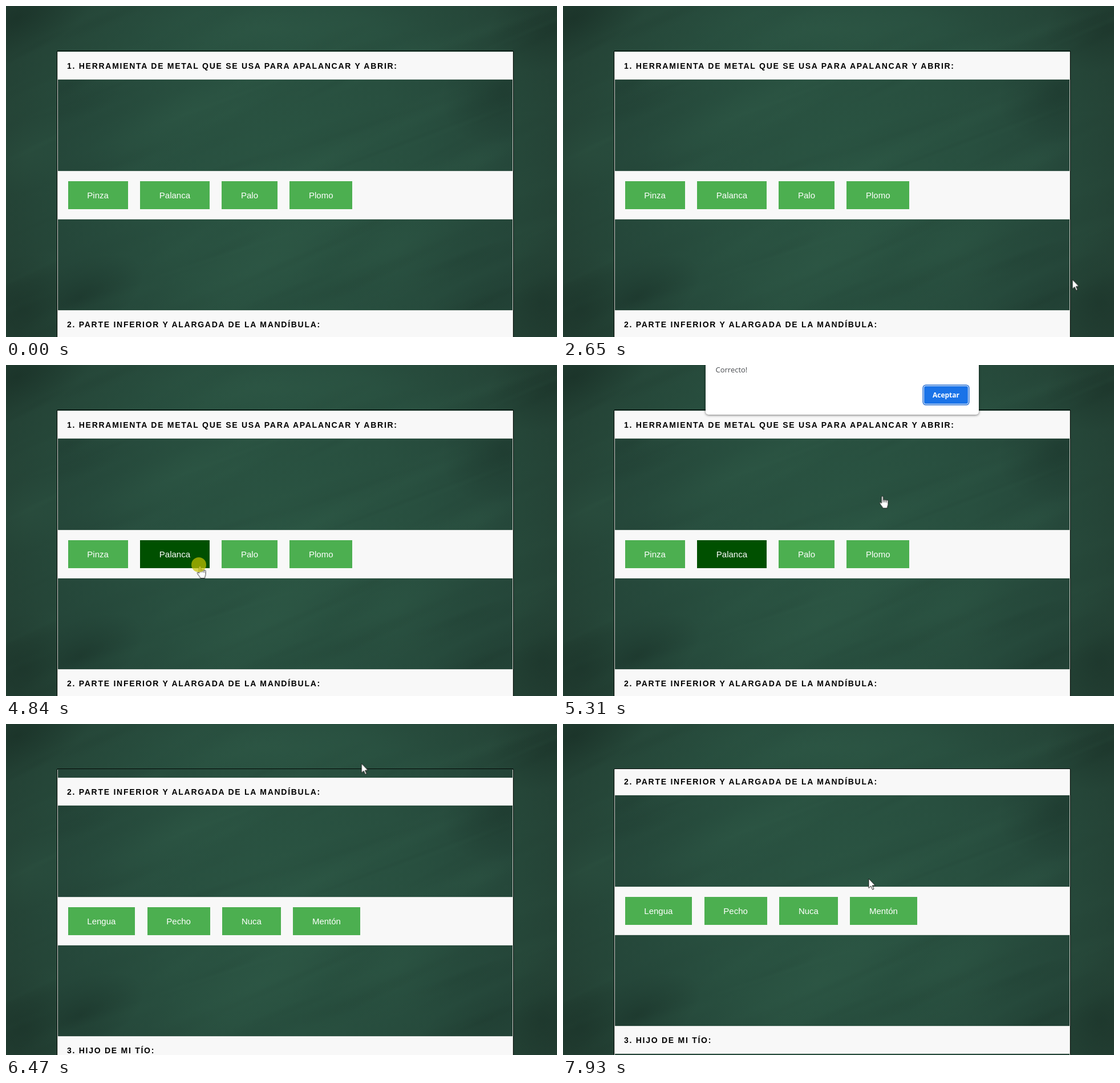
An HTML page with a canvas that plays this animation: 966 by 580 pixels, repeating every 8 s.

```html
<!DOCTYPE html>
<html lang="es">
<head>
<meta charset="utf-8">
<title>Quiz</title>
<style>
html, body { margin: 0; width: 966px; height: 580px; overflow: hidden; background: #264a3c; }
body { position: relative; font-family: "Liberation Sans", Arial, sans-serif; }
canvas { position: absolute; left: 0; top: 0; }

#panel {
  position: absolute; left: 89px; top: 78px; width: 799px; height: 520px;
  border: 1px solid #050a08; border-radius: 2px; overflow: hidden;
}
#panel::after {
  content: ""; position: absolute; inset: 1px 0 0;
  border: solid #d3dad2; border-width: 0 1px;
}
#list { position: absolute; inset: 0; animation: scroll 8s linear infinite; }
.title, .options {
  position: absolute; left: 0; width: 799px; box-sizing: border-box;
  display: flex; align-items: center; background: #f8f8f8; border: 1px solid #dcdfdc;
}
.title {
  height: 49px; padding-left: 16px; white-space: pre;
  font-weight: bold; font-size: 14px; letter-spacing: 1.73px; color: #000;
}
.options { height: 85px; padding-left: 17.5px; gap: 21.4px; }
.options span {
  height: 49px; line-height: 49px; padding: 0 33.8px;
  background: #4caf50; color: #fff; font-size: 15px;
}
.options .pick { animation: pick 8s step-end infinite; }

#dialog {
  position: absolute; left: 250px; top: -60px; width: 479px; height: 147px;
  background: #fff; border-radius: 5px; box-shadow: 0 1px 4px rgba(0,0,0,.55);
  font-family: "Open Sans", "Noto Sans", sans-serif;
  animation: dialog 8s linear infinite;
}
#dialog p {
  position: absolute; left: 17.5px; top: 58px; margin: 0;
  font-size: 13px; line-height: 20px; color: #4a4d51;
}
#dialog b {
  position: absolute; left: 383px; top: 97px; width: 77px; height: 31px;
  line-height: 31px; text-align: center; font-size: 12px; font-weight: 700;
  color: #fff; background: #1a73e8; border-radius: 3px;
  box-shadow: 0 0 0 1px #fff, 0 0 0 2.5px #1a66d0;
  animation: press 8s step-end infinite;
}

#cursor { position: absolute; left: 0; top: 0; width: 1px; height: 1px; overflow: visible; animation: move 8s linear infinite; }
#cursor path { stroke-linejoin: round; }
#arrow { animation: arrow 8s step-end infinite; }
#hand { animation: hand 8s step-end infinite; }
#ring { animation: ring 8s step-end infinite; }

@keyframes scroll {
  0% { transform: translateY(0); }
  77.44% { transform: translateY(0); animation-timing-function: ease-in-out; }
  81.45%, 100% { transform: translateY(-457px); }
}
@keyframes pick {
  0% { background: #4caf50; }
  54.875%, 100% { background: #005000; }
}
@keyframes dialog {
  0%, 62.5% { transform: translateY(-24px); opacity: 0; }
  63.75%, 77.375% { transform: none; opacity: 1; }
  78% { transform: translateY(-9px); opacity: .69; }
  79.625%, 100% { transform: translateY(-30px); opacity: 0; }
}
@keyframes press {
  0% { box-shadow: 0 0 0 1px #fff, 0 0 0 2.5px #1a66d0; }
  75.5%, 100% { box-shadow: 0 0 0 2px #1a73e8; }
}
@keyframes arrow {
  0%, 69.25% { opacity: 1; }
  54.875% { opacity: 0; }
}
@keyframes hand {
  0%, 69.25% { opacity: 0; }
  54.875% { opacity: 1; }
}
@keyframes ring {
  0%, 62%, 76.75% { opacity: 0; }
  60.4%, 75.5% { opacity: 1; }
}
@keyframes move {
  0%, 4.1% { transform: translate(457px, 600px); }
  4.11% { transform: translate(458px, 562px); }
  5.5% { transform: translate(565px, 512px); }
  7% { transform: translate(680px, 497px); }
  8.5% { transform: translate(800px, 522px); }
  9.875%, 33.09% { transform: translate(868px, 600px); }
  33.1%, 33.125% { transform: translate(894px, 480px); }
  36.25% { transform: translate(690px, 320px); }
  38.75% { transform: translate(440px, 195px); }
  40.625% { transform: translate(355px, 162px); }
  42.5%, 43% { transform: translate(410px, 178px); }
  46.25% { transform: translate(517px, 190px); }
  48.75% { transform: translate(440px, 131px); }
  51% { transform: translate(345px, 200px); }
  53.125% { transform: translate(286px, 293px); }
  55.625% { transform: translate(290px, 325px); }
  58.625%, 62% { transform: translate(340px, 352px); }
  63.4% { transform: translate(400px, 396px); }
  64.8% { transform: translate(485px, 325px); }
  66.375% { transform: translate(559.5px, 230px); }
  68% { transform: translate(610px, 140px); }
  70% { transform: translate(662px, 56px); }
  76.25% { transform: translate(655px, 48px); }
  78% { transform: translate(652px, 46px); }
  80.875% { transform: translate(623.5px, 69px); }
  84% { transform: translate(575px, 125px); }
  88% { transform: translate(450px, 185px); }
  91.625% { transform: translate(295px, 165px); }
  92.5% { transform: translate(262px, 155px); }
  93.75% { transform: translate(246px, 178px); }
  95.5% { transform: translate(420px, 200px); }
  97.2% { transform: translate(570px, 222px); }
  99%, 100% { transform: translate(536px, 271px); }
}
</style>
</head>
<body>
<canvas id="board" width="966" height="580"></canvas>

<div id="panel"><div id="list"></div></div>

<div id="dialog"><p>Correcto!</p><b>Aceptar</b></div>

<svg id="cursor">
  <path id="arrow" d="M0 0V16.5L3.8 12.9 6.6 19.2 9 18.1 6.2 12H11.4Z" fill="#fff" stroke="#111" stroke-width=".9"/>
  <g id="hand" transform="translate(-5.5 0)" stroke="#111" stroke-width=".9" fill="none">
    <path fill="#fff" d="M4 13V2a1.5 1.5 0 0 1 3 0v6a1.4 1.4 0 0 1 2.8 0a1.4 1.4 0 0 1 2.8 .6a1.4 1.4 0 0 1 2.9 .8v5c0 3-1.5 4-1.5 7.2H6.3c0-2.2-4.8-6-5.4-9c-.3-1.9 2-1.6 3.1 .4Z"/>
    <path d="M7 8v3.4M9.8 8v3.4M12.6 8.8v3"/>
  </g>
  <circle id="ring" cx="-2" cy="-2" r="13" fill="rgba(200,195,0,.7)"/>
</svg>

<script>
const STEP = 453;
const quiz = [
  ["1. HERRAMIENTA DE METAL QUE SE USA PARA APALANCAR Y ABRIR:", ["Pinza", "Palanca", "Palo", "Plomo"]],
  ["2. PARTE INFERIOR Y ALARGADA DE LA MANDÍBULA:", ["Lengua", "Pecho", "Nuca", "Mentón"]],
  ["3. HIJO DE MI TÍO:", []]
];
document.getElementById("list").innerHTML = quiz.map(([title, words], i) => {
  const y = 1 + i * STEP;
  const buttons = words.map(w => `<span${w === "Palanca" ? ' class="pick"' : ""}>${w}</span>`).join("");
  return `<div class="title" style="top:${y}px">${title}</div>
    <div class="options" style="top:${y + 208.5}px">${buttons}</div>`;
}).join("");

// Chalkboard: vignette, broad smudges, then faint diagonal strokes
const ctx = document.getElementById("board").getContext("2d");
let seed = 7;
const rnd = () => (seed = seed * 16807 % 2147483647) / 2147483647;

function smudge(x, y, rx, ry, tone, angle = -0.45) {
  const rgb = tone > 0 ? "62,112,88" : "18,38,30";
  const g = ctx.createRadialGradient(0, 0, 0, 0, 0, 1);
  g.addColorStop(0, `rgba(${rgb},${Math.abs(tone)})`);
  g.addColorStop(1, `rgba(${rgb},0)`);
  ctx.save();
  ctx.translate(x, y);
  ctx.rotate(angle);
  ctx.scale(rx, ry);
  ctx.fillStyle = g;
  ctx.fillRect(-1, -1, 2, 2);
  ctx.restore();
}

function chalk(x, y, w, h, edge, blobs) {
  ctx.save();
  ctx.beginPath();
  ctx.rect(x, y, w, h);
  ctx.clip();
  const g = ctx.createRadialGradient(0, 0, 0, 0, 0, 1);
  g.addColorStop(0, "#2a5442");
  g.addColorStop(.5, "#284f3f");
  g.addColorStop(1, edge);
  ctx.save();
  ctx.translate(x + w / 2, y + h * .45);
  ctx.scale(w * .58, h * .95);
  ctx.fillStyle = g;
  ctx.fillRect(-2, -2, 4, 4);
  ctx.restore();
  blobs.forEach(b => smudge(...b));
  for (let i = 0; i < 110; i++) {
    smudge(x + rnd() * w, y + rnd() * h, 80 + rnd() * 160, 5 + rnd() * 20,
      (rnd() - .5) * .13, -.5 + rnd() * .2);
  }
  ctx.restore();
}

chalk(0, 0, 966, 580, "#233f33", [
  [20, 20, 150, 70, -.45], [950, 30, 110, 80, -.35], [30, 530, 120, 90, -.35],
  [940, 520, 90, 90, -.3], [480, 40, 260, 60, .14, 0], [40, 260, 110, 60, .12]
]);
chalk(91, 79, 798, 501, "#244438", [
  [130, 510, 120, 60, -.35], [870, 150, 110, 90, -.3], [840, 520, 150, 50, -.2],
  [320, 185, 220, 40, .12], [450, 450, 220, 70, .14], [690, 430, 130, 50, .1],
  [110, 150, 110, 60, -.12], [830, 270, 80, 30, .1]
]);
</script>
</body>
</html>
```
